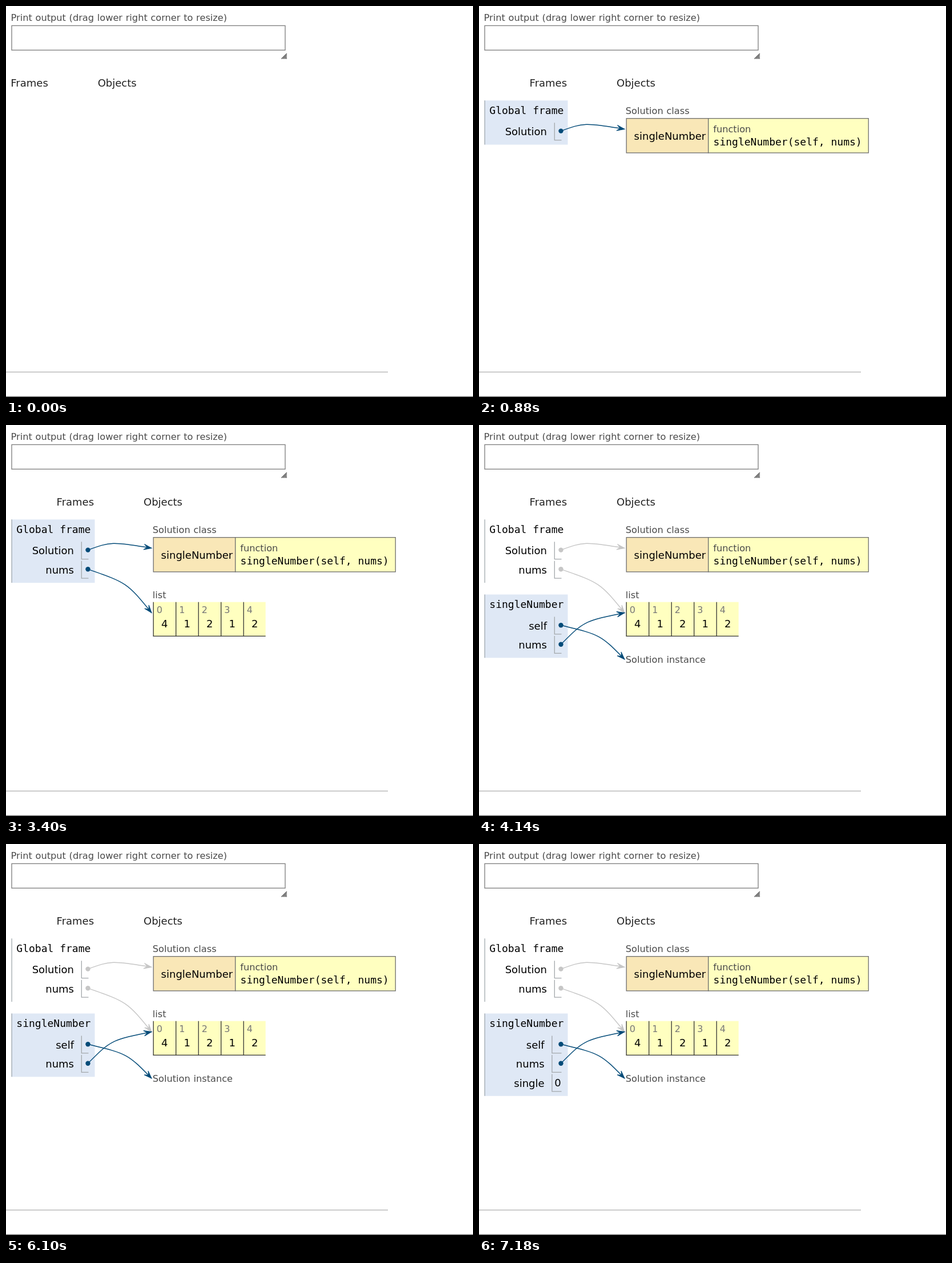
An HTML page for the animation above (8 s loop, 818 by 684 pixels).

```html
<!DOCTYPE html>
<html lang="en">
<head>
<meta charset="utf-8">
<title>Execution visualizer</title>
<style>
  html, body { margin: 0; width: 100%; height: 100%; overflow: hidden; background: #fff; }
  svg { display: block; width: 100%; height: 100%; }
  text { font-family: "DejaVu Sans", sans-serif; font-size: 18px; fill: #000; white-space: pre; }
  .mono { font-family: "DejaVu Sans Mono", monospace; }
  .head { fill: #222; }
  .label { font-size: 16.2px; fill: #4a4a4a; word-spacing: .034em; }
  .index { font-size: 16px; fill: #777; }
</style>
</head>
<body>
<svg id="stage" viewBox="0 0 818 684"></svg>
<script>
const LOOP = 8000;
const STEPS = [780, 2600, 4140, 7040];   // times at which the program advances
const BLUE = '#044b78', DIM = '#c6c6c6', YELLOW = '#ffffc0';
const stage = document.getElementById('stage');

const text = (x, y, str, cls = '', anchor = 'start') =>
  `<text x="${x}" y="${y}" class="${cls}" text-anchor="${anchor}">${str}</text>`;
const rect = (x, y, w, h, fill, stroke = 'none') =>
  `<rect x="${x}" y="${y}" width="${w}" height="${h}" fill="${fill}" stroke="${stroke}" stroke-width="1.3"/>`;
const path = (d, stroke, width = 1.3) =>
  `<path d="${d}" fill="none" stroke="${stroke}" stroke-width="${width}"/>`;

// Curved pointer from a dot to a notched arrowhead
function arrow(x, y, cx, cy, tx, ty, color) {
  const angle = Math.atan2(ty - cy, tx - cx) * 180 / Math.PI;
  return path(`M${x} ${y}C${cx} ${cy} ${cx} ${cy} ${tx} ${ty}`, color, 1.4) +
    `<circle cx="${x}" cy="${y}" r="4.2" fill="${color}"/>` +
    `<path d="M0 0L-13.5 -4.8L-7.6 0L-13.5 4.8Z" fill="${color}" stroke="${color}"
      transform="translate(${tx} ${ty}) rotate(${angle})"/>`;
}

// Stack frame: title plus one row per variable
function stackFrame(y, title, vars, active, boxX = 132) {
  const h = 77.3 + (vars.length - 1) * 33.5;
  let out = active ? rect(9.5, y, 146, h, '#dfe8f5') : '';
  out += path(`M10.1 ${y}v${h}`, '#a0aaae') + text(18.3, y + 23.7, title, 'mono');
  vars.forEach((name, i) => {
    const top = y + 39 + i * 33.5;
    out += text(boxX - 13, top + 22, name, '', 'end') +
      path(`M${boxX + .3} ${top}v30.3H144.5`, '#a3a7ab');
  });
  return out;
}

function page(shift) {
  let grip = '';
  for (let i = 0; i < 4; i++) {
    grip += path(`M${482.5 + i * 2.6} 92.5L491.8 ${83.2 + i * 2.6}`, '#555', 1.4);
  }
  return rect(0, 0, 818, 684, '#fff') +
    text(8.6, 25.5, 'Print output (drag lower right corner to resize)', 'label') +
    rect(10, 34.4, 479, 42.8, '#fff', '#7c7c7c') + grip +
    text(8.3 + shift, 140.7, 'Frames', 'head') +
    text(160.7 + shift, 140.7, 'Objects', 'head') +
    path('M0 640.3H669', '#b0b0b0') + path('M0 683.4H818', '#707070');
}

function classObject() {
  return text(256.8, 189, 'Solution class', 'label') +
    rect(258.2, 196.7, 143.5, 60.2, '#f9e7b7', '#6d6d6d') +
    rect(401.7, 196.7, 280.5, 60.2, YELLOW, '#6d6d6d') +
    text(271.6, 233.5, 'singleNumber') +
    text(410.2, 221.3, 'function', 'label') +
    text(410.6, 244.3, 'singleNumber(self, nums)', 'mono');
}

function listObject(values) {
  let out = text(256.8, 303.2, 'list', 'label') + rect(257.7, 309.7, 197, 60, YELLOW);
  values.forEach((v, i) => {
    const x = 258.2 + i * 39.5;
    out += path(`M${x} 309.7v60`, '#333') +
      text(x + 5.6, 328.5, i, 'index') + text(x + 19.6, 354.3, v, '', 'middle');
  });
  return out + path('M257.7 369.4H454.7', '#333');
}

function draw(step) {
  let out = page(step ? 80.3 : 0);
  if (step >= 1) {
    const names = step >= 2 ? ['Solution', 'nums'] : ['Solution'];
    out += stackFrame(165.3, 'Global frame', names, step < 3) + classObject();
  }
  if (step >= 2) out += listObject([4, 1, 2, 1, 2]);
  if (step >= 3) {
    const names = ['self', 'nums'].concat(step >= 4 ? ['single'] : []);
    out += stackFrame(296.5, 'singleNumber', names, true, step >= 4 ? 127.6 : 132) +
      text(256.8, 416, 'Solution instance', 'label');
  }
  if (step >= 4) out += text(132.2, 424.2, '0');

  const outer = step >= 3 ? DIM : BLUE;
  if (step >= 1) out += arrow(143.5, 218.6, 184, 204, 255, 215.4, outer);
  if (step >= 2) out += arrow(143.5, 252.3, 212, 276, 255, 328.5, outer);
  if (step >= 3) {
    out += arrow(143.5, 350.2, 213, 367, 255, 410, BLUE) +
      arrow(143.5, 383.8, 184, 343, 255, 328.5, BLUE);
  }
  stage.innerHTML = out;
}

let shown = -1;
const start = performance.now();
function tick() {
  const t = (performance.now() - start) % LOOP;
  const step = STEPS.filter(s => t >= s).length;
  if (step !== shown) draw(shown = step);
  requestAnimationFrame(tick);
}
tick();
</script>
</body>
</html>
```
